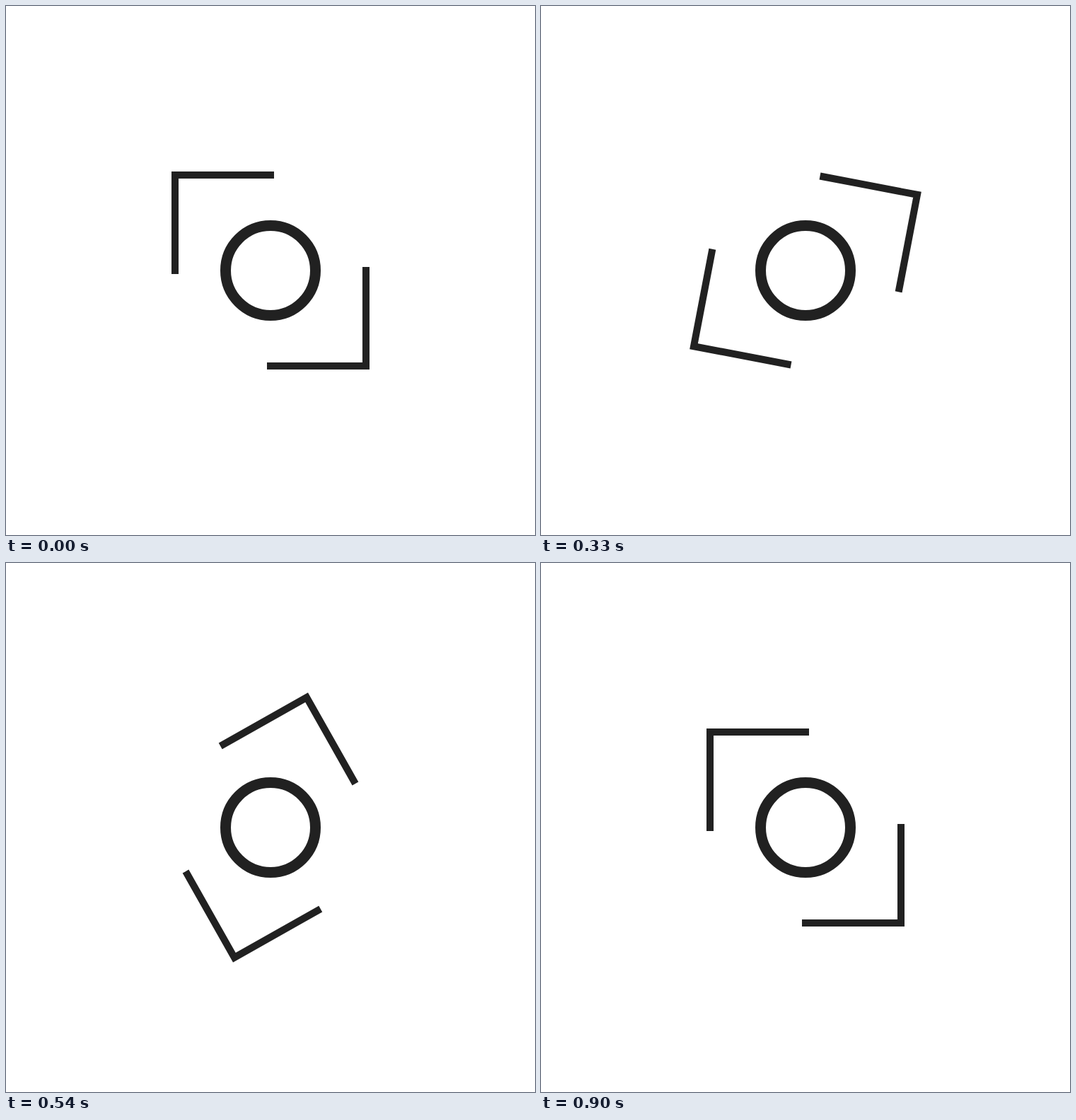
An HTML page that plays this animation: 748x748 px, repeating every 1830 ms.

```html
<!DOCTYPE html>
<html lang="en">
<head>
<meta charset="utf-8">
<title>Rotating brackets</title>
<style>
  html, body { margin: 0; width: 100%; height: 100%; overflow: hidden; background: #fff; }
  svg { display: block; width: 100%; height: 100%; }
  path, circle { fill: none; stroke: #212121; }
</style>
</head>
<body>
<svg viewBox="-374 -374 748 748">
  <circle r="63.5" stroke-width="15"/>
  <path id="brackets" stroke-width="10" d="M-135 5V-135H5M135-5V135H-5"/>
</svg>
<script>
const LOOP = 1830, TURN = 900, STEP = 30;
const brackets = document.getElementById('brackets');

// cubic-bezier(.42, 0, .58, 1)
function easeInOut(x) {
  let lo = 0, hi = 1;
  for (let i = 0; i < 30; i++) {
    const s = (lo + hi) / 2;
    if (((0.52 * s - 0.78) * s + 1.26) * s < x) lo = s; else hi = s;
  }
  return lo * lo * (3 - 2 * lo);
}

const start = performance.now();

function draw(now) {
  const elapsed = Math.max(0, now - start) % LOOP;
  const t = Math.floor(elapsed / STEP) * STEP;
  const angle = t < TURN ? 360 * easeInOut(t / TURN) : 0;
  brackets.setAttribute('transform', `rotate(${angle})`);
  requestAnimationFrame(draw);
}
draw(start);
</script>
</body>
</html>
```
